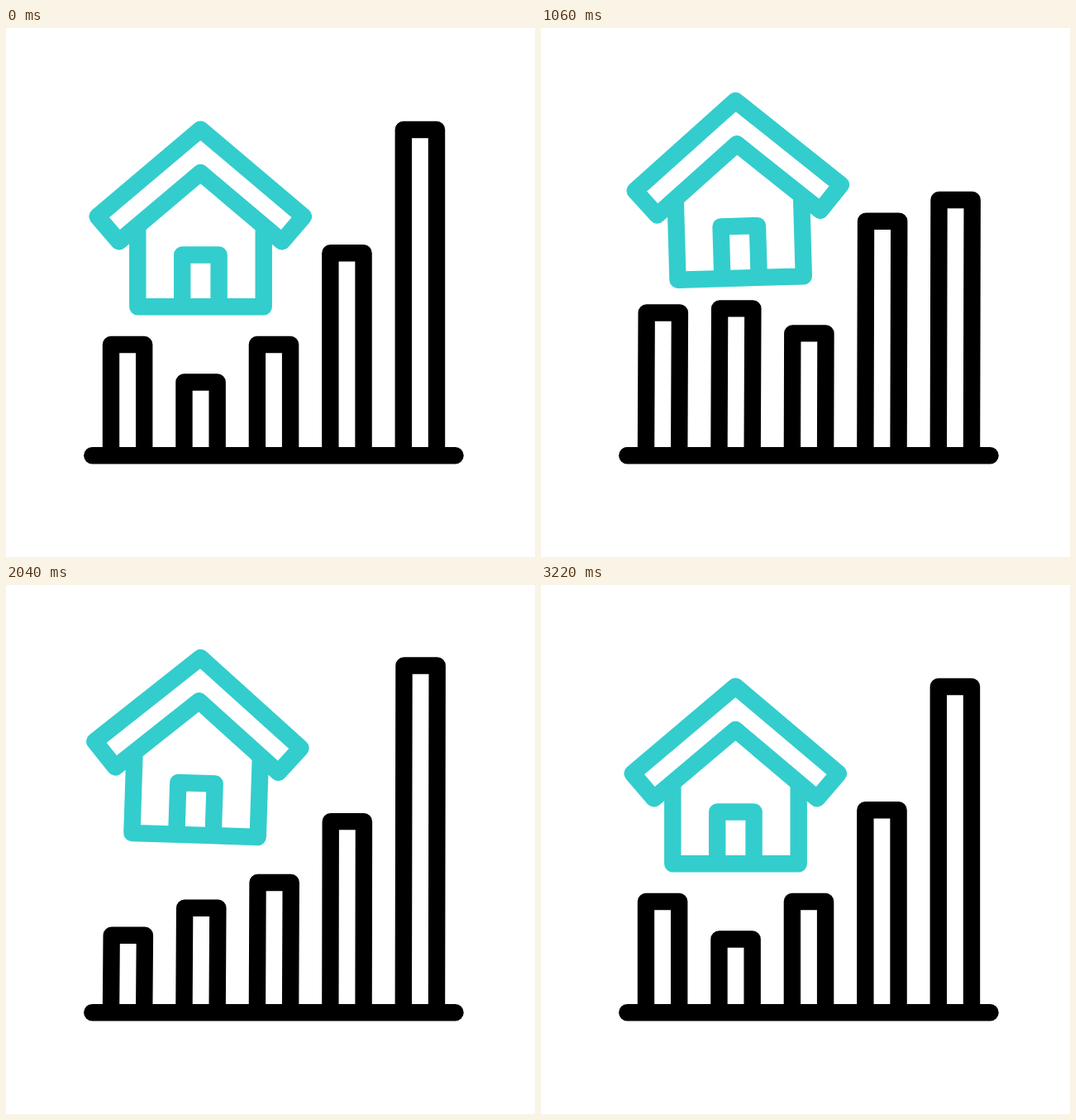
An HTML page that plays this animation: 640x640 px, repeating every 3.56 s.

```html
<!DOCTYPE html>
<html lang="en">
<head>
<meta charset="utf-8">
<title>Housing market bars</title>
<style>
  html, body { margin: 0; width: 100%; height: 100%; overflow: hidden; background: #fff; }
  svg { display: block; width: 100vw; height: 100vh; }
  path { fill: none; stroke-width: 20.4; stroke-linejoin: round; }
  #chart { stroke: #000; }
  #house { stroke: #33cdcd; }
</style>
</head>
<body>
<svg viewBox="0 0 640 640">
  <g id="house">
    <path d="M159.3 240V337.3H311.7V240"/>
    <path d="M213.2 337.3V274.5H257.6V337.3"/>
    <path d="M235.3 122.6L360 228L334 258.4L235.3 175L136.6 258.4L110.6 228Z"/>
  </g>
  <g id="chart">
    <path d="M104.3 517.2H543.5" stroke-linecap="round"/>
  </g>
</svg>
<script>
const LOOP = 3560, STEP = 20, BASE = 517.2, HALF = 20.1;
const chart = document.getElementById('chart');
const house = document.getElementById('house');

const ease = u => (1 - Math.cos(Math.PI * Math.min(1, Math.max(0, u)))) / 2;

// A motion leaves 0 at `start`, eases through [time, offset] turns, and is back at 0 by `end`.
function motion(start, end, ...turns) {
  const keys = [[start, 0], ...turns, [end, 0]];
  return t => keys.slice(1).reduce((sum, [t1, b], i) => {
    const [t0, a] = keys[i];
    return sum + (b - a) * ease((t - t0) / (t1 - t0));
  }, 0);
}

const lift = motion(220, 3220, [490, -72], [1030, -34.7], [2880, -34.7]);
const swing = motion(755, 2270, [1330, -3], [1870, 3]);
const wave = sink => motion(420, 2870, [1150, -40], [1780, sink]);

const bars = [
  [383, wave(47)],
  [428.5, motion(220, 2670, [690, -103.5], [1400, -76.5])],
  [383, motion(780, 3220, [1480, -39.5], [2450, -13])],
  [272.3, wave(16)],
  [123, motion(460, 3220, [1310, 106], [2110, -28])]
].map(([rest, move], i) => {
  const path = document.createElementNS('http://www.w3.org/2000/svg', 'path');
  chart.append(path);
  return { path, rest, move, x: 147.1 + 88.45 * i };
});

function draw(t) {
  house.setAttribute('transform',
    `translate(0 ${lift(t)}) rotate(${swing(t)} 235.3 122.6)`);
  for (const { path, rest, move, x } of bars) {
    const dy = move(t), y = rest + dy;
    // Bars lean very slightly while away from rest.
    const lean = 0.7 * Math.min(1, Math.abs(dy) / 25);
    const l = x - HALF, r = x + HALF;
    path.setAttribute('d', `M${l} ${BASE}L${l + lean} ${y}H${r + lean}L${r} ${BASE}`);
  }
}

const start = performance.now();
function tick() {
  const t = (performance.now() - start) % LOOP;
  draw(Math.floor(t / STEP) * STEP);
  requestAnimationFrame(tick);
}
tick();
</script>
</body>
</html>
```
